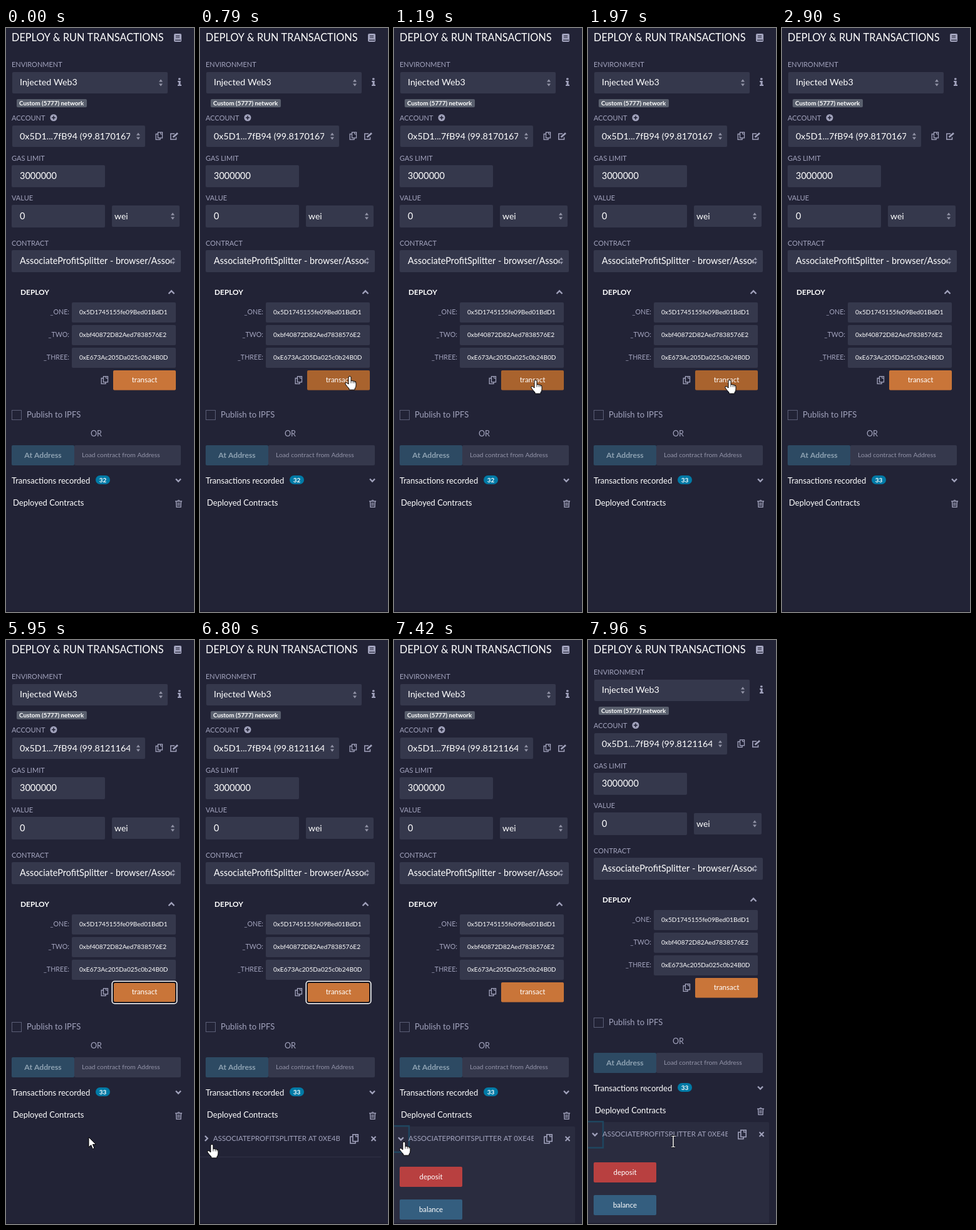
An HTML page with a canvas for the animation above (8 s loop, 300 by 928 pixels).

```html
<!DOCTYPE html>
<html lang="en">
<head>
<meta charset="utf-8">
<title>Deploy panel</title>
<style>
html, body { margin: 0; width: 100%; height: 100%; overflow: hidden; background: #222336; }
canvas { display: block; width: 300px; height: 928px; }
</style>
</head>
<body>
<canvas id="stage" width="300" height="928"></canvas>
<script>
const ctx = document.getElementById('stage').getContext('2d');
const LOOP = 8000;
const C = {
  bg: '#222336', field: '#35384c', panel: '#2a2c3f', label: '#a2a3bd', white: '#fff',
  orange: '#c97539', hover: '#a9632e', badge: '#007aa6', red: '#b84040', blue: '#345e7f'
};

const ARROW = new Path2D('M0 0V16L3.700 12.500L6.300 18.700L9 17.500L6.400 11.600H11.500Z');
const HAND = new Path2D('M-1 1.500Q1 -1 3 1.500V8Q5 6.500 6.500 8.200Q8 7.200 9 9Q11 8.300 11 10.500V15Q11 18 9 20V22H0V20Q-3 17 -6 13Q-7 10 -4 10.500L-1 13Z');

// Pointer: [time, x, y, shape]; it jumps from one pose to the next.
const POINTER = [
  [0, 0, 0, ''],
  [150, 288, 908, 'arrow'], [230, 284, 850, 'arrow'], [310, 278, 770, 'arrow'], [390, 272, 690, 'arrow'],
  [470, 266, 620, 'arrow'], [550, 258, 565, 'hand'], [630, 252, 545, 'hand'], [710, 246, 548, 'hand'],
  [790, 238, 553, 'hand'], [890, 230, 559, 'hand'],
  [960, 227, 562, 'hand'], [1040, 222, 556, 'hand'], [1120, 223, 558, 'hand'], [1190, 225, 559, 'hand'],
  [2060, 223, 600, 'arrow'], [2130, 217, 690, 'arrow'], [2210, 209, 775, 'arrow'],
  [2290, 202, 840, 'arrow'], [2360, 199, 870, 'arrow'],
  [2510, 198, 862, 'arrow'], [2590, 196, 852, 'arrow'], [2660, 196, 845, 'arrow'], [2900, 0, 0, ''],
  [5150, 239, 700, 'arrow'], [5230, 225, 722, 'arrow'], [5310, 198, 750, 'arrow'],
  [5390, 165, 775, 'arrow'], [5470, 142, 787, 'arrow'], [5550, 132, 790, 'arrow'],
  [6410, 118, 803, 'arrow'], [6490, 85, 815, 'arrow'], [6570, 50, 819, 'arrow'],
  [6650, 28, 814, 'arrow'], [6730, 20, 807, 'hand'], [6800, 18, 801, 'hand'],
  [6950, 15, 800, 'hand'], [7030, 13, 798, 'hand'], [7350, 14, 797, 'hand'], [7420, 15, 797, 'hand'],
  [7730, 80, 799, 'beam'], [7810, 136, 797, 'beam']
];

function box(x, y, w, h, fill, r = 2) {
  ctx.fillStyle = fill;
  ctx.beginPath();
  ctx.roundRect(x, y, w, h, r);
  ctx.fill();
}

function text(str, x, y, size, color = C.white, weight = 400, align = 'left') {
  ctx.font = `${weight} ${size}px Lato, sans-serif`;
  ctx.textAlign = align;
  ctx.fillStyle = color;
  ctx.fillText(str, x, y);
}

function clipped(right, draw) {
  ctx.save();
  ctx.beginPath();
  ctx.rect(0, 0, right, 928);
  ctx.clip();
  draw();
  ctx.restore();
}

function line(points, color, width) {
  ctx.strokeStyle = color;
  ctx.lineWidth = width;
  ctx.beginPath();
  points.forEach(([x, y]) => ctx.lineTo(x, y));
  ctx.stroke();
}

function chevron(x, y, angle, size = 4) {
  ctx.save();
  ctx.translate(x, y);
  ctx.rotate(angle);
  line([[-size, -size / 2], [0, size / 2], [size, -size / 2]], C.label, 2.3);
  ctx.restore();
}

function sorter(x, y) {
  ctx.fillStyle = '#9495a8';
  for (const s of [-1, 1]) {
    ctx.beginPath();
    ctx.moveTo(x - 3, y + s * 1.5);
    ctx.lineTo(x + 3, y + s * 1.5);
    ctx.lineTo(x, y + s * 5.5);
    ctx.fill();
  }
}

function copyIcon(x, y, s = 1) {
  ctx.save();
  ctx.translate(x, y);
  ctx.scale(s, s);
  ctx.strokeStyle = C.label;
  ctx.lineWidth = 1.3;
  ctx.strokeRect(4, .7, 7, 9);
  line([[4, 3.5], [.7, 3.5], [.7, 12.3], [7.5, 12.3], [7.5, 9.7]], C.label, 1.3);
  line([[8, .7], [8, 3.5], [11, 3.5]], C.label, 1);
  ctx.restore();
}

function editIcon(x, y) {
  line([[x + 7, y + 2], [x + .8, y + 2], [x + .8, y + 11], [x + 9.5, y + 11], [x + 9.5, y + 7.5]], C.label, 1.5);
  line([[x + 4.5, y + 7.5], [x + 12, y + 1]], C.label, 2.8);
}

function trashIcon(x, y) {
  line([[x, y + 2], [x + 11, y + 2]], C.label, 1.4);
  line([[x + 3.5, y + 2], [x + 4.5, y + .3], [x + 6.5, y + .3], [x + 7.5, y + 2]], C.label, 1);
  line([[x + 1.5, y + 2], [x + 2, y + 11.3], [x + 9, y + 11.3], [x + 9.5, y + 2]], C.label, 1.3);
  for (const dx of [3.8, 5.5, 7.2]) line([[x + dx, y + 4], [x + dx, y + 9.5]], C.label, .9);
}

function header() {
  text('DEPLOY & RUN TRANSACTIONS', 9, 21, 16.3);
  box(268, 9, 12, 13, C.label);
  line([[271, 12.5], [277, 12.5]], C.bg, 1);
  line([[271, 15], [277, 15]], C.bg, 1);
  line([[270, 19.3], [279, 19.3]], C.bg, 1.2);
}

function settings(balance) {
  text('ENVIRONMENT', 9, 62, 11, C.label);
  box(10, 70, 248, 34, C.field);
  text('Injected Web3', 22, 91, 14.3);
  sorter(247, 87);
  box(275, 79.5, 3.5, 3, C.label, 1);
  box(274, 84, 4.5, 2, C.label, 0);
  box(275.5, 84, 3, 7, C.label, 0);
  box(274, 90, 6, 2, C.label, 0);
  box(17, 113, 112, 13, '#595f6d');
  text('Custom (5777) network', 21, 123, 9.8, C.white, 700);

  text('ACCOUNT', 9, 147, 11, C.label);
  box(70.5, 137, 11, 11, C.label, 6);
  line([[73, 142.5], [79, 142.5]], C.bg, 1.6);
  line([[76, 139.5], [76, 145.5]], C.bg, 1.6);
  box(10, 155, 212, 34, C.field);
  clipped(198, () => text(`0x5D1...7fB94 (${balance}`, 22, 177, 14.3));
  sorter(211, 172);
  copyIcon(238.5, 165);
  editIcon(262, 166);

  text('GAS LIMIT', 9, 211, 11, C.label);
  box(9, 218, 149, 35, C.field);
  text('3000000', 22, 240, 14.5);
  text('VALUE', 9, 274, 11, C.label);
  box(9, 281, 149, 36, C.field);
  text('0', 22, 304, 14.5);
  box(169, 282, 108, 34, C.field);
  text('wei', 173, 304, 14);
  sorter(266, 299);

  text('CONTRACT', 9, 346, 11, C.label);
  box(9, 353, 270, 35, C.field);
  clipped(264, () => text('AssociateProfitSplitter - browser/Associate', 22, 375, 14.4));
  sorter(267, 370);
}

function deployForm(state) {
  text('DEPLOY', 23, 424, 11.9, C.white, 700);
  chevron(264, 420, Math.PI, 4.5);
  [['_ONE:', '0x5D1745155fe09Bed01BdD1'],
   ['_TWO:', '0xbf40872D82Aed7838576E2'],
   ['_THREE:', '0xE673Ac205Da025c0b24B0D']].forEach(([name, value], i) => {
    const y = 436 + i * 36;
    text(name, 101, y + 19, 10.7, C.label, 400, 'right');
    box(105, y, 166, 32, C.field);
    clipped(259, () => text(value, 117, y + 19, 10.1));
  });

  copyIcon(151.5, 553);
  if (state.glow) box(168, 541, 106, 38, 'rgba(201,117,57,.4)', 5);
  if (state.ring) {
    box(169, 542, 104, 36, '#15151f', 4);
    box(172, 545, 98, 30, C.orange);
    ctx.strokeStyle = C.white;
    ctx.lineWidth = 1.6;
    ctx.beginPath();
    ctx.roundRect(169.3, 542.3, 103.4, 35.4, 4);
    ctx.stroke();
  } else {
    box(171, 544, 100, 31.5, state.hover ? C.hover : C.orange);
  }
  text('transact', 221, 563, 11.5, C.white, 400, 'center');
}

function lower(count) {
  ctx.strokeStyle = '#5b5e76';
  ctx.lineWidth = 1;
  ctx.strokeRect(9.5, 607.5, 15, 15);
  text('Publish to IPFS', 33, 619, 13.1, C.label);
  text('OR', 144, 649, 12.7, C.label, 400, 'center');
  box(9, 663, 100, 32, '#2d4a63');
  text('At Address', 59, 683, 12.2, '#8fa3b3', 700, 'center');
  box(109, 663, 170, 32, C.field);
  text('Load contract from Address', 121, 682, 10.3, '#9293a8');

  text('Transactions recorded', 9, 724, 13);
  box(143, 711, 23, 14, C.badge, 7);
  text(count, 154.5, 722, 10, C.white, 700, 'center');
  chevron(275, 718.5, 0);
  text('Deployed Contracts', 11, 759, 13);
  trashIcon(270, 750);
}

function instance(open) {
  if (open) {
    box(0, 773, 289, 170, C.panel);
    ctx.strokeStyle = '#1f465f';
    ctx.lineWidth = 2.5;
    ctx.strokeRect(-4, 772.3, 28, 41.5);
    chevron(11, 792.5, 0);
    box(9, 837, 100, 32, C.red);
    text('deposit', 59, 857, 11.4, C.white, 400, 'center');
    box(9, 889, 100, 32, C.blue);
    text('balance', 59, 909, 11.4, C.white, 400, 'center');
  } else {
    chevron(10, 792, -Math.PI / 2);
    box(0, 821, 289, 1, '#303246', 0);
  }
  clipped(223, () => text('ASSOCIATEPROFITSPLITTER AT 0XE4B', open ? 23 : 21, 796, 11.4, C.label));
  copyIcon(239, 785, 1.2);
  line([[273.5, 789], [280.5, 796]], C.label, 2);
  line([[280.5, 789], [273.5, 796]], C.label, 2);
}

function pointer([, x, y, shape]) {
  ctx.save();
  ctx.translate(x, y);
  if (shape === 'beam') {
    const beam = [[-3, -8.5], [0, -8.5], [0, 8.5], [-3, 8.5], [3, 8.5], [0, 8.5], [0, -8.5], [3, -8.5]];
    line(beam, '#000', 2.5);
    line(beam, C.white, 1);
  } else if (shape) {
    const path = shape === 'hand' ? HAND : ARROW;
    ctx.fillStyle = C.white;
    ctx.fill(path);
    ctx.strokeStyle = '#000';
    ctx.lineWidth = 1;
    ctx.stroke(path);
    if (shape === 'hand') {
      for (const dx of [3, 6.3, 9]) line([[dx, 8], [dx, 11.5]], '#000', .8);
    }
  }
  ctx.restore();
}

function render(t) {
  const pose = POINTER.findLast(key => key[0] <= t);
  const between = (from, to) => t >= from && t < to;

  ctx.fillStyle = C.bg;
  ctx.fillRect(0, 0, 300, 928);
  header();
  ctx.save();
  if (t >= 7960) ctx.translate(0, -7);
  settings(t < 5950 ? '99.8170167' : '99.8121164');
  deployForm({
    hover: between(550, 2060),
    glow: between(1410, 1970),
    ring: between(5720, 7190)
  });
  lower(t < 1510 ? '32' : '33');
  if (t >= 6030) instance(t >= 7270);
  ctx.restore();
  box(0, 926.5, 300, 1.5, '#1b1b2b', 0);
  pointer(pose);
}

function tick() {
  render(performance.now() % LOOP);
  requestAnimationFrame(tick);
}
tick();
</script>
</body>
</html>
```
